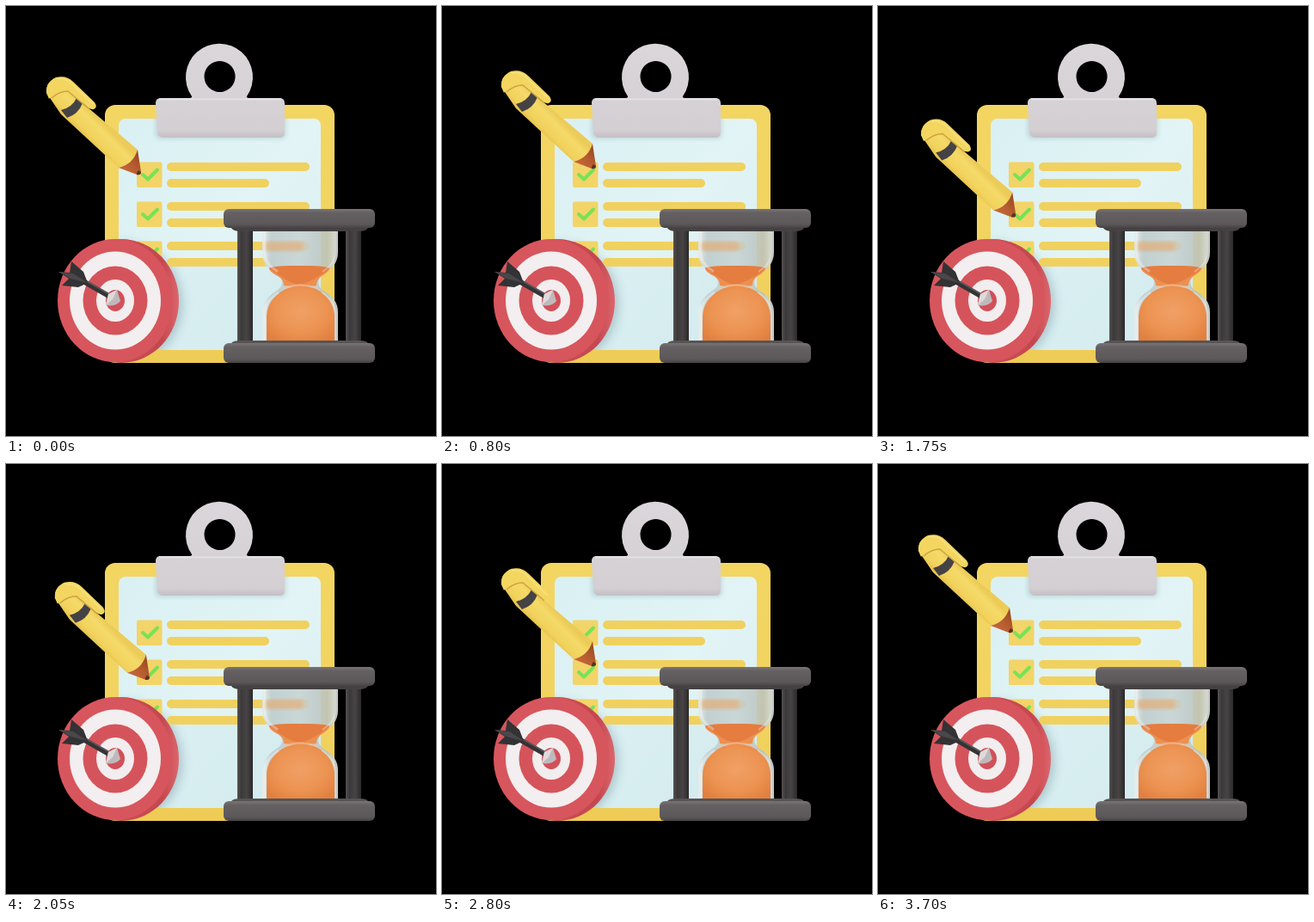
An HTML page that plays this animation: 500 by 500 pixels, repeating every 3.75 s.

```html
<!DOCTYPE html>
<html lang="en">
<head>
<meta charset="utf-8">
<title>Checklist</title>
<style>
html, body { margin: 0; width: 100%; height: 100%; overflow: hidden; background: #000; }
svg { display: block; width: 100vw; height: 100vh; }
</style>
</head>
<body>
<svg viewBox="0 0 500 500">
  <defs>
    <linearGradient id="board" x2="0" y2="1">
      <stop stop-color="#f3d562"/><stop offset=".6" stop-color="#f2d360"/><stop offset="1" stop-color="#eecb55"/>
    </linearGradient>
    <linearGradient id="paper" x2="1" y2="1">
      <stop stop-color="#d9f0f3"/><stop offset=".5" stop-color="#e2f4f5"/><stop offset="1" stop-color="#d8edf0"/>
    </linearGradient>
    <linearGradient id="clip" x2="0" y2="1">
      <stop stop-color="#dad6d9"/><stop offset=".92" stop-color="#d3cfd3"/><stop offset="1" stop-color="#c4bfc4"/>
    </linearGradient>
    <linearGradient id="rim">
      <stop stop-color="#d6545b"/><stop offset=".85" stop-color="#c4474f"/><stop offset="1" stop-color="#dc666c"/>
    </linearGradient>
    <linearGradient id="plate" x2="0" y2="1">
      <stop stop-color="#7a7576"/><stop offset=".2" stop-color="#656162"/><stop offset=".8" stop-color="#5c5859"/><stop offset="1" stop-color="#474345"/>
    </linearGradient>
    <linearGradient id="pillar">
      <stop stop-color="#565152"/><stop offset=".25" stop-color="#3c393a"/><stop offset=".6" stop-color="#484445"/><stop offset="1" stop-color="#2b292a"/>
    </linearGradient>
    <linearGradient id="glass">
      <stop stop-color="#e6edec" stop-opacity=".95"/><stop offset=".12" stop-color="#bccaca" stop-opacity=".85"/>
      <stop offset=".5" stop-color="#c6d2d1" stop-opacity=".85"/><stop offset=".86" stop-color="#b9c2bf" stop-opacity=".85"/>
      <stop offset="1" stop-color="#dde2df" stop-opacity=".9"/>
    </linearGradient>
    <radialGradient id="sand" cy=".45" r=".65">
      <stop stop-color="#f0a066"/><stop offset=".6" stop-color="#ec9352"/><stop offset="1" stop-color="#e27f3e"/>
    </radialGradient>
    <linearGradient id="barrel" gradientUnits="userSpaceOnUse" x1="90" y1="155" x2="111" y2="134">
      <stop stop-color="#e3bb4a"/><stop offset=".3" stop-color="#f1d25c"/><stop offset=".75" stop-color="#f5da69"/><stop offset="1" stop-color="#eccb58"/>
    </linearGradient>
    <linearGradient id="nib" gradientUnits="userSpaceOnUse" x1="134" y1="190" x2="153" y2="172">
      <stop stop-color="#c4693a"/><stop offset=".5" stop-color="#b65c30"/><stop offset="1" stop-color="#9c4a25"/>
    </linearGradient>
    <filter id="soft" x="-30%" y="-30%" width="160%" height="160%"><feGaussianBlur stdDeviation="6"/></filter>
    <filter id="blur"><feGaussianBlur stdDeviation="2"/></filter>
    <clipPath id="page"><rect x="131" y="131" width="235" height="269" rx="8"/></clipPath>
    <g id="item" fill="none" stroke-linecap="round" stroke-linejoin="round">
      <rect x="152" y="181.500" width="29.500" height="29.500" rx="2" fill="#f2d468"/>
      <path d="M192 187H348M192 206H301" stroke="#f0d160" stroke-width="10"/>
      <path d="M159 196L165 201.500L176 190.500" stroke="#78e256" stroke-width="4"/>
    </g>
  </defs>

  <!-- Clipboard -->
  <rect x="115" y="115" width="267" height="300" rx="12" fill="url(#board)"/>
  <rect x="131" y="131" width="235" height="269" rx="8" fill="url(#paper)"/>
  <g clip-path="url(#page)">
    <rect x="131" y="303" width="235" height="97" fill="#bfdde5" opacity=".25"/>
    <rect x="173" y="118" width="153" height="37" rx="6" fill="#8eabb2" opacity=".3" filter="url(#blur)"/>
    <ellipse cx="138" cy="346" rx="67" ry="70" fill="#71949e" opacity=".45" filter="url(#soft)"/>
  </g>
  <use href="#item"/>
  <use href="#item" y="46"/>
  <use href="#item" y="92"/>
  <path fill="url(#clip)" fill-rule="evenodd" d="M180 107H212Q217 107 216 105A39 39 0 1 1 280 105Q279 107 284 107H318Q324 107 324 113V147Q324 153 318 153H183Q177 153 176 147L174 113Q174 107 180 107ZM248.500 64a18 18 0 1 0 .1 0Z"/>
  <path d="M178 108.500H320" stroke="#e4e1e4" stroke-width="2"/>

  <!-- Target -->
  <ellipse cx="134" cy="343" rx="67" ry="72" fill="url(#rim)"/>
  <g id="rings"></g>
  <path d="M86 318L121 338" stroke="#343335" stroke-width="6"/>
  <path d="M87 316L120 335" stroke="#59575a" stroke-width="1.500"/>
  <path d="M116 348L119 335L129 330L133 343Q128 350 116 348Z" fill="#c0b9bb"/>
  <path d="M116 348L119 335L129 330L124 341Z" fill="#dedada"/>
  <path d="M61 309L74 310L76 297L90 309L95 322L84 327L65 325L73 317Z" fill="#333234"/>
  <path d="M61 309L78 311L95 322L75 317Z" fill="#49474a"/>

  <!-- Hourglass -->
  <rect x="269" y="257" width="18" height="136" fill="url(#pillar)"/>
  <rect x="395" y="257" width="18" height="136" fill="url(#pillar)"/>
  <path fill="url(#glass)" d="M298 258H386V286C386 300 378 306 370 311C362 316 361 324 368 330C380 337 386 345 386 356V392H298V356C298 345 305 337 316 330C324 324 322 316 314 311C306 306 298 300 298 286Z"/>
  <rect x="301" y="274" width="45" height="11" rx="4" fill="#e2ae80" opacity=".7" filter="url(#blur)"/>
  <path d="M306 305Q309 302 341 302T376 305Q376 309 367 314Q361 318 361 325Q342 329 323 325Q323 318 316 314Q306 309 306 305Z" fill="#ec9050"/>
  <path d="M306 305Q309 302 341 302T376 305Q370 311 357 318Q341 328 327 319Q314 311 306 305Z" fill="#e57c40"/>
  <path d="M303 390V362C303 345 315 333 328 328Q342 324 358 328C370 333 382 345 382 362V390Z" fill="url(#sand)"/>
  <path d="M322 328Q342 321 363 328" fill="none" stroke="#f2c09a" stroke-width="2" opacity=".7"/>
  <path d="M301 262V286C301 299 309 304 316 309M301 388V356C301 346 308 339 317 333" fill="none" stroke="#fff" stroke-width="3" opacity=".3"/>
  <path d="M383 262V286C383 299 375 304 368 309M383 388V356C383 346 376 339 367 333" fill="none" stroke="#fff" stroke-width="2" opacity=".3"/>
  <path d="M262 254H421V258Q419 262 410 262H273Q264 262 262 258Z" fill="#454143"/>
  <rect x="253" y="236" width="176" height="22" rx="6" fill="url(#plate)"/>
  <path d="M262 396V392Q264 389 273 389H411Q419 389 421 392V396Z" fill="#585455"/>
  <rect x="253" y="392" width="176" height="23" rx="6" fill="url(#plate)"/>

  <!-- Pen -->
  <g id="pen">
    <path d="M47 101Q46 89 57 84L74 90L88 112L153 167Q150 184 131 188L64 126Z" fill="url(#barrel)"/>
    <path d="M64 121Q77 118 82 107L89 113Q84 126 71 130Z" fill="#454246"/>
    <path d="M47 101Q46 89 58 83Q70 80 78 88L103 112Q107 118 102 120Q98 121 94 117L74 100Q69 97 63 99Q53 102 50 108Z" fill="#f3d660"/>
    <path d="M53 107Q62 99 72 99L97 120" fill="none" stroke="#cfa443" stroke-width="1.500"/>
    <path d="M59 85Q68 83 76 90L101 114" fill="none" stroke="#fae58c" stroke-width="2" opacity=".6"/>
    <path d="M131 188Q148 184 153 167L157 193Q157 197 152 196Z" fill="url(#nib)"/>
    <path d="M154 191L157 193Q157 197 152 196L152 194Z" fill="#593325"/>
  </g>
</svg>
<script>
const byId = id => document.getElementById(id);

// Ring radii and colours
byId('rings').innerHTML = [
  [67, 71.5, '#d7565d'], [53, 57, '#f3eeef'], [37.5, 40, '#d5545b'], [22, 24.5, '#f2edee'], [11, 12.5, '#d2505a']
].map(([rx, ry, fill]) => `<ellipse cx="127" cy="342.500" rx="${rx}" ry="${ry}" fill="${fill}"/>`).join('');

// Pen stops: time, x, y
const LOOP = 3750, STEP = 50;
const stops = [
  [0, 0, 0], [300, 9, 9], [800, 22, -7], [1130, 22, -7], [1670, 2, 48],
  [1970, 9, 56], [2470, 22, 39], [2800, 22, 39], [3350, 0, 0], [LOOP, 0, 0]
];
const ease = u => u * u * (3 - 2 * u);

function draw(now) {
  const t = Math.floor(now % LOOP / STEP) * STEP;
  const next = stops.findIndex(stop => stop[0] > t);
  const [t0, x0, y0] = stops[next - 1], [t1, x1, y1] = stops[next];
  const k = ease((t - t0) / (t1 - t0));
  byId('pen').setAttribute('transform', `translate(${x0 + (x1 - x0) * k} ${y0 + (y1 - y0) * k})`);
}

const start = performance.now();
function tick() {
  draw(performance.now() - start);
  requestAnimationFrame(tick);
}
tick();
</script>
</body>
</html>
```
